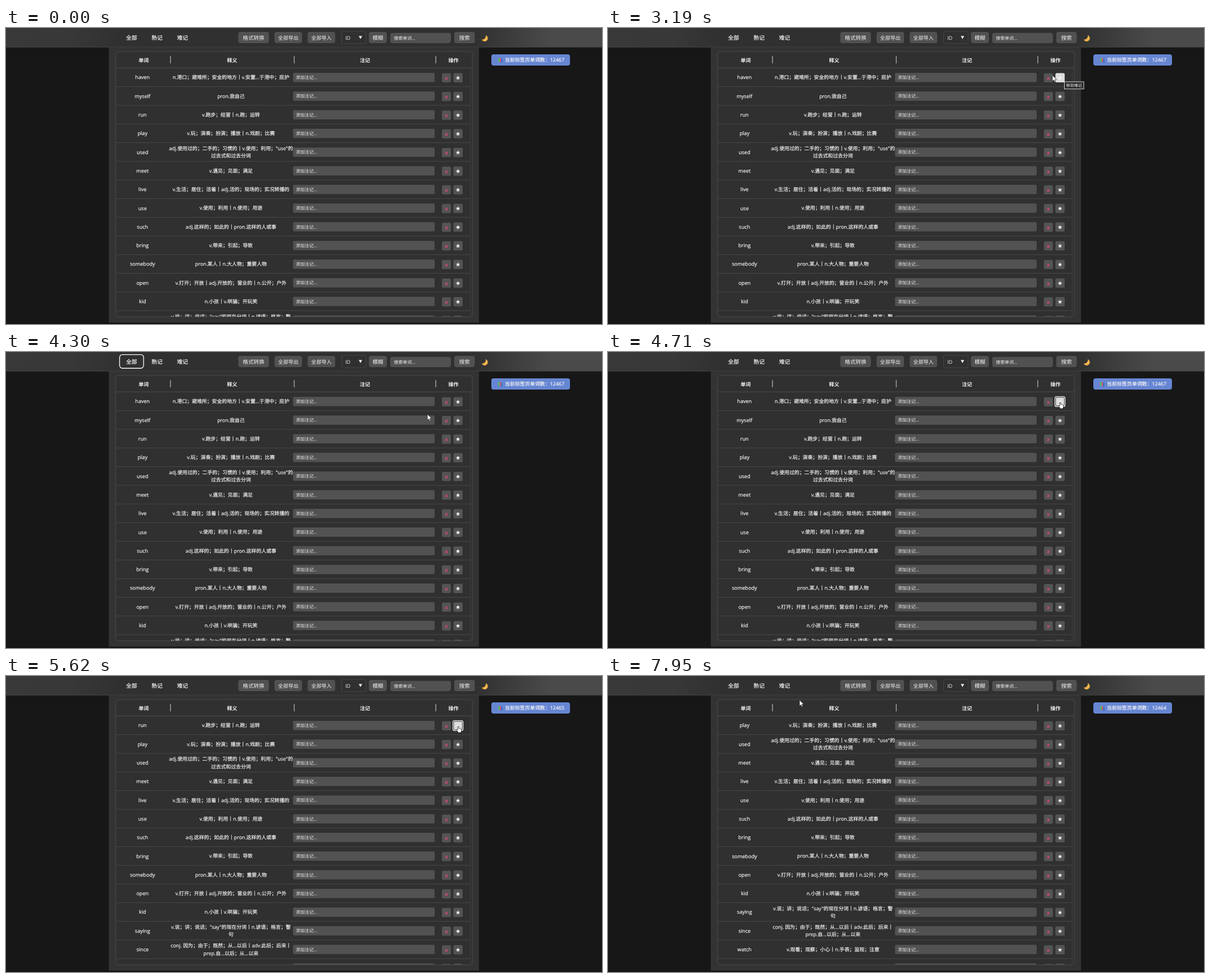
An HTML page that plays this animation: 1061 px wide and 528 px high, repeating every 8 s.

```html
<!DOCTYPE html>
<html>
<head>
<meta charset="utf-8">
<title>Word list</title>
<style>
  html, body { margin: 0; width: 100%; height: 100%; overflow: hidden; background: #171717; }
  svg { display: block; width: 1061px; height: 528px; }
  text {
    font-family: "Open Sans", "Noto Sans CJK SC", "Noto Sans CJK", "Noto Sans", sans-serif;
    fill: #f4f4f4; text-rendering: geometricPrecision; text-spacing-trim: space-all;
  }
  .firm { stroke: #f4f4f4; stroke-width: .2px; }
  .bold { font-weight: 700; }
</style>
</head>
<body>
<svg id="stage" viewBox="0 0 1061 528" xmlns="http://www.w3.org/2000/svg"></svg>
<script>
const LOOP = 8000, ROW = 33.3, TOP = 71.3;

const words = [
  ['haven', 'n.港口；避难所；安全的地方丨v.安置...于港中；庇护'],
  ['myself', 'pron.我自己'],
  ['run', 'v.跑步；经营丨n.跑；运转'],
  ['play', 'v.玩；演奏；扮演；播放丨n.戏剧；比赛'],
  ['used', 'adj.使用过的；二手的；习惯的丨v.使用；利用；"use"的', '过去式和过去分词'],
  ['meet', 'v.遇见；见面；满足'],
  ['live', 'v.生活；居住；活着丨adj.活的；现场的；实况转播的'],
  ['use', 'v.使用；利用丨n.使用；用途'],
  ['such', 'adj.这样的；如此的丨pron.这样的人或事'],
  ['bring', 'v.带来；引起；导致'],
  ['somebody', 'pron.某人丨n.大人物；重要人物'],
  ['open', 'v.打开；开放丨adj.开放的；营业的丨n.公开；户外'],
  ['kid', 'n.小孩丨v.哄骗；开玩笑'],
  ['saying', 'v.说；讲；说话；"say"的现在分词丨n.谚语；格言；警', '句'],
  ['since', 'conj. 因为；由于；既然；从...以后丨adv.此后；后来丨', 'prep.自...以后；从...以来'],
  ['watch', 'v.观看；观察；小心丨n.手表；监视；注意'],
  ['', '']
];

// Shape helpers; text is centred vertically on y
const rect = (x, y, w, h, fill, r = 0, more = '') =>
  `<rect x="${x}" y="${y}" width="${w}" height="${h}" rx="${r}" fill="${fill}" ${more}/>`;
const text = (x, y, size, str, more = 'class="firm"', anchor = 'middle') =>
  `<text x="${x}" y="${(y + size * .385).toFixed(2)}" font-size="${size}" text-anchor="${anchor}" ${more}>${str}</text>`;
const path = (d, fill, more = '') => `<path d="${d}" fill="${fill}" ${more}/>`;
const button = (x, w, label, size) => rect(x, 7, w, 20, '#515151', 4) + text(x + w / 2, 17, size, label, '');

function star(cx, cy, r) {
  let d = '';
  for (let i = 0; i < 10; i++) {
    const a = Math.PI * (i / 5 - .5), q = i % 2 ? r * .4 : r;
    d += (i ? 'L' : 'M') + (cx + q * Math.cos(a)).toFixed(2) + ' ' + (cy + q * Math.sin(a)).toFixed(2);
  }
  return path(d + 'z', '#f4f4f4');
}

function row([word, ...lines], i) {
  const y = TOP + ROW * i, c = y + ROW / 2;
  const defs = lines.map((s, k) => text(400.5, c + (k - (lines.length - 1) / 2) * 13.5, 8.9, s)).join('');
  return text(243, c, 9.1, word) + defs +
    rect(511, c - 8, 252, 16.5, '#525252', 2.5) + text(516, c + .2, 7.9, '添加注记...', '', 'start') +
    rect(776, c - 7.2, 16, 16.3, '#545454', 2.5) +
    path(`M781.6 ${c - .4}l4.6 4.8m0 -4.8l-4.6 4.8`, 'none', 'stroke="#e3496f" stroke-width="1.1"') +
    rect(796.5, c - 7.5, 16.5, 16.5, '#545454', 2.5) + star(804.6, c + 1.1, 4.2) +
    rect(195.5, y + ROW - .5, 630.5, 1, '#484848');
}

const header =
  rect(0, 0, 1061, 34, 'url(#bar)') + rect(0, 33.6, 1061, 1, '#484848') +
  ['全部', '熟记', '难记'].map((s, i) => text(223.6 + 45.3 * i, 17.2, 9.8, s)).join('') +
  button(413.5, 54.5, '格式转换', 9.6) + button(478, 49, '全部导出', 9.1) + button(537, 49, '全部导入', 9.1) +
  rect(597.5, 6, 43.5, 22, '#303030', 2, 'stroke="#464646"') +
  text(604, 17, 9.1, 'ID', '', 'start') + path('M628 14.2h6l-3 5.6z', '#f4f4f4') +
  button(646, 32, '模糊', 9.6) +
  rect(684, 8.8, 108, 18.2, '#515151', 4) + text(690.5, 17.8, 7.9, '搜索单词...', '', 'start') +
  button(798, 36.5, '搜索', 9.6) +
  path('M854 13A5.6 5.6 0 1 1 847 20.5A6.2 6.2 0 0 0 854 13z', '#f6b44b');

const table =
  rect(183, 34.6, 659, 491, '#333') +
  rect(195.2, 42.2, 635, 473, '#303030', 5, 'stroke="#4b4b4b"') +
  [[245, '单词'], [402.5, '释义'], [639, '注记'], [796.5, '操作']]
    .map(([x, s]) => text(x, 57, 9.1, s, 'class="bold"')).join('') +
  [292.3, 512.6, 764.6].map(x => rect(x, 50, 1, 13, '#d8d8d8')).join('') +
  rect(195.5, 70.6, 634.5, 1, '#4b4b4b') + rect(825.8, 71, .8, 443, '#444') +
  `<g clip-path="url(#body)"><g id="rows">${words.map(row).join('')}</g></g>`;

const badge =
  rect(864, 47, 140, 20, '#6686d3', 4) +
  rect(876, 53.5, 3, 6.5, '#58b368', .5) + rect(879, 54, 2.4, 7, '#d9595f', .5) + rect(881.2, 55, 2.6, 7, '#3f6fc4', .5) +
  `<g id="count">${text(888, 57, 8.95, '', 'class="firm"', 'start')}</g>`;

const overlays =
  `<g id="tab">${rect(202.3, 4.6, 42.6, 24.4, 'none', 5, 'stroke="#fff" stroke-width="1.3"')}</g>` +
  `<g id="hover">${rect(796.5, 80.5, 16.5, 16.5, '#dcdcdc', 2.5)}${star(804.6, 89, 4.2)}</g>` +
  `<g id="focus">${rect(795.6, 79.6, 18, 17.8, 'none', 3, 'stroke="#fff" stroke-width="1.2"')}` +
  `${rect(796.7, 80.7, 15.8, 15.6, 'none', 2.2, 'stroke="#222" stroke-width=".9"')}</g>` +
  `<g id="tip">${rect(812.5, 95.9, 34.5, 12.8, '#2b2b2b', 0, 'stroke="#d6d6d6"')}${text(829.8, 102.4, 7, '移到难记', '')}</g>` +
  `<g id="cursor">
    <path id="arrow" d="M0 0V10.4L2.4 8.2L4.1 12L5.8 11.2L4.2 7.6L7.5 7.5z" fill="#fff" stroke="#111" stroke-width=".6"/>
    <path id="hand" d="M-.9 .8Q0 -.6 .9 .8V4.4Q2 3.7 2.7 4.7Q3.7 4.1 4.3 5.1Q5.6 4.8 5.7 6.2V8.6Q5.6 10 4.8 11V12H-.3V11Q-2 9 -3 7.1Q-2.8 5.8 -1.7 6.5L-.9 7.4z" fill="#fff" stroke="#111" stroke-width=".7"/>
  </g>`;

document.getElementById('stage').innerHTML =
  `<defs>
    <linearGradient id="bar" gradientUnits="userSpaceOnUse" x1="0" y1="0" x2="1061" y2="90">
      <stop offset="0" stop-color="#393939"/><stop offset=".11" stop-color="#383838"/>
      <stop offset=".19" stop-color="#303030"/><stop offset=".78" stop-color="#303030"/>
      <stop offset=".84" stop-color="#3c3c3c"/><stop offset=".91" stop-color="#4a4a4a"/>
      <stop offset="1" stop-color="#4a4a4a"/>
    </linearGradient>
    <clipPath id="body"><rect x="195" y="71.3" width="635" height="443.6" rx="4"/></clipPath>
  </defs>` + rect(0, 526, 1061, 2, '#121212') + table + header + badge + overlays;

const $ = id => document.getElementById(id);
const countText = $('count').firstChild;

// Pointer stops: time, x, y, and 1 when the move into the stop is eased
const stops = [
  [850, 778, 0], [1000, 790, 14], [1150, 806, 40], [1280, 832, 84], [1340, 835, 94],
  [1420, 812, 90], [1570, 805, 89], [3189, 805, 89], [3190, 794, 85], [3330, 400, 8],
  [3360, 334, -4], [3550, 334, -4], [3750, 224, 18, 1], [3950, 224, 18], [4120, 420, 62],
  [4300, 750, 111], [4330, 755, 111], [4360, 755, 111], [4580, 805, 89, 1], [5720, 805, 89],
  [6060, 276, 36, 1], [6759, 276, 36], [6760, 280, 36], [6930, 337, 37, 1], [7090, 337, 37],
  [7380, 717, 74, 1], [7530, 717, 74], [7950, 341, 43, 1]
];
const removals = [4750, 5390, 5650];
const pressed = [[4650, 4750], [5240, 5390], [5550, 5650]];

const clamp = v => Math.max(0, Math.min(1, v));
const between = (t, a, b) => t >= a && t < b;
const show = (id, on) => $(id).setAttribute('visibility', on ? 'visible' : 'hidden');
const fade = (t, a, b) => Math.min(clamp((t - a) / 120), clamp((b - t) / 120));

function pointer(t) {
  const i = stops.findIndex(s => s[0] > t);
  if (i < 0) return stops[stops.length - 1].slice(1, 3);
  if (i === 0) return [778, -30];
  const [t0, x0, y0] = stops[i - 1], [t1, x1, y1, eased] = stops[i];
  let k = (t - t0) / (t1 - t0);
  if (eased) k = k * k * (3 - 2 * k);
  return [x0 + (x1 - x0) * k, y0 + (y1 - y0) * k];
}

function draw(t) {
  const [x, y] = pointer(t);
  const onStar = between(x, 797, 812) && between(y, 80, 97);
  const onTab = between(x, 203, 245) && between(y, 5, 29);
  $('cursor').setAttribute('transform', `translate(${x.toFixed(2)} ${y.toFixed(2)})`);
  show('cursor', t >= 850);
  $('arrow').style.display = onStar || onTab ? 'none' : '';
  $('hand').style.display = onStar || onTab ? '' : 'none';

  const gone = removals.filter(r => t >= r).length;
  $('rows').setAttribute('transform', `translate(0 ${-ROW * gone})`);
  const label = '当前标签页单词数：' + (12467 - gone);
  if (countText.textContent !== label) countText.textContent = label;

  $('hover').setAttribute('opacity', Math.max(fade(t, 1450, 3340), fade(t, 4560, 5850)));
  show('focus', pressed.some(([a, b]) => between(t, a, b)));
  show('tab', between(t, 3830, 4650));
  show('tip', between(t, 1990, 3230));
}

const start = performance.now();
function tick() {
  draw((performance.now() - start) % LOOP);
  requestAnimationFrame(tick);
}
tick();
</script>
</body>
</html>
```
